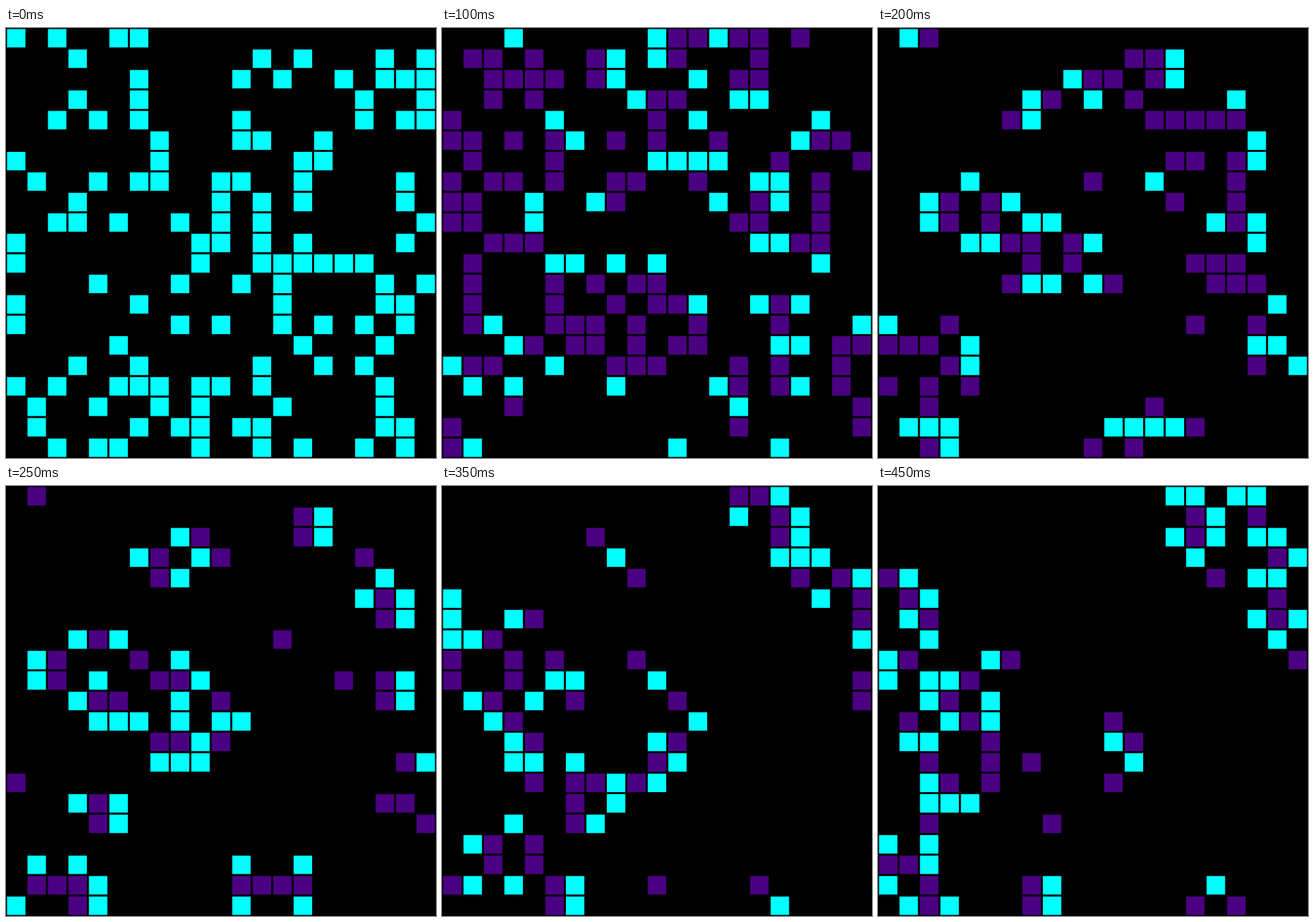
An HTML page that plays this animation: 600 by 600 pixels, repeating every 500 ms.

```html
<!DOCTYPE html>
<html lang="en">
<head>
<meta charset="utf-8">
<title>Brian's Brain</title>
<style>
html, body { margin: 0; width: 100%; height: 100%; overflow: hidden; background: #000; }
svg { display: block; width: 100vw; height: 100vh; }
</style>
</head>
<body>
<svg id="stage" viewBox="0 0 600 600"></svg>
<script>
const N = 21, SIZE = 600 / N, INSET = SIZE / 20;
const STEP = 50, STEPS = 10;
const OFF = 0, ON = 1, DYING = 2;
const COLORS = ['#000', '#0ff', '#4b0082'];

// Starting soup: columns of the live cells, row by row. Everything after it is computed.
const SOUP = [
  [0, 2, 5, 6], [3, 12, 14, 18, 20], [6, 11, 13, 16, 18, 19, 20],
  [3, 6, 17, 20], [2, 4, 6, 11, 17, 19, 20], [7, 11, 12, 15],
  [0, 7, 14, 15], [1, 4, 6, 7, 10, 11, 14, 19], [3, 10, 12, 14, 19],
  [2, 3, 5, 8, 10, 12, 20], [0, 9, 10, 12, 14, 19], [0, 9, 12, 13, 14, 15, 16, 17],
  [4, 8, 11, 13, 18, 20], [0, 6, 13, 18, 19], [0, 8, 10, 13, 15, 17, 19],
  [5, 14, 18], [3, 6, 12, 15, 17], [0, 2, 5, 6, 7, 9, 10, 12, 18],
  [1, 4, 7, 9, 13, 18], [1, 6, 8, 9, 11, 12, 18, 19], [2, 4, 5, 9, 12, 14, 17, 19]
];

const range = n => [...Array(n).keys()];
const makeGrid = cell => range(N).map(r => range(N).map(c => cell(r, c)));
const wrap = i => (i + N) % N;

function liveNeighbours(grid, row, col) {
  let n = 0;
  for (let dr = -1; dr <= 1; dr++)
    for (let dc = -1; dc <= 1; dc++)
      if ((dr || dc) && grid[wrap(row + dr)][wrap(col + dc)] === ON) n++;
  return n;
}

const evolve = grid => makeGrid((r, c) => {
  if (grid[r][c] === ON) return DYING;
  if (grid[r][c] === DYING) return OFF;
  return liveNeighbours(grid, r, c) === 2 ? ON : OFF;
});

const generations = [makeGrid((r, c) => SOUP[r].includes(c) ? ON : OFF)];
while (generations.length < STEPS) generations.push(evolve(generations.at(-1)));

const stage = document.getElementById('stage');

function addRect(x, y, size) {
  const rect = document.createElementNS('http://www.w3.org/2000/svg', 'rect');
  const attrs = { x, y, width: size, height: size, fill: COLORS[OFF] };
  for (const key in attrs) rect.setAttribute(key, attrs[key]);
  return stage.appendChild(rect);
}

addRect(0, 0, 600);
const cells = makeGrid((r, c) =>
  addRect(c * SIZE + INSET, r * SIZE + INSET, SIZE - 2 * INSET));

let shown = -1;
function render(ms) {
  const step = Math.floor(ms / STEP) % STEPS;
  if (step === shown) return;
  shown = step;
  makeGrid((r, c) => cells[r][c].setAttribute('fill', COLORS[generations[step][r][c]]));
}

const start = performance.now();
function tick() {
  render(performance.now() - start);
  requestAnimationFrame(tick);
}
tick();
</script>
</body>
</html>
```
